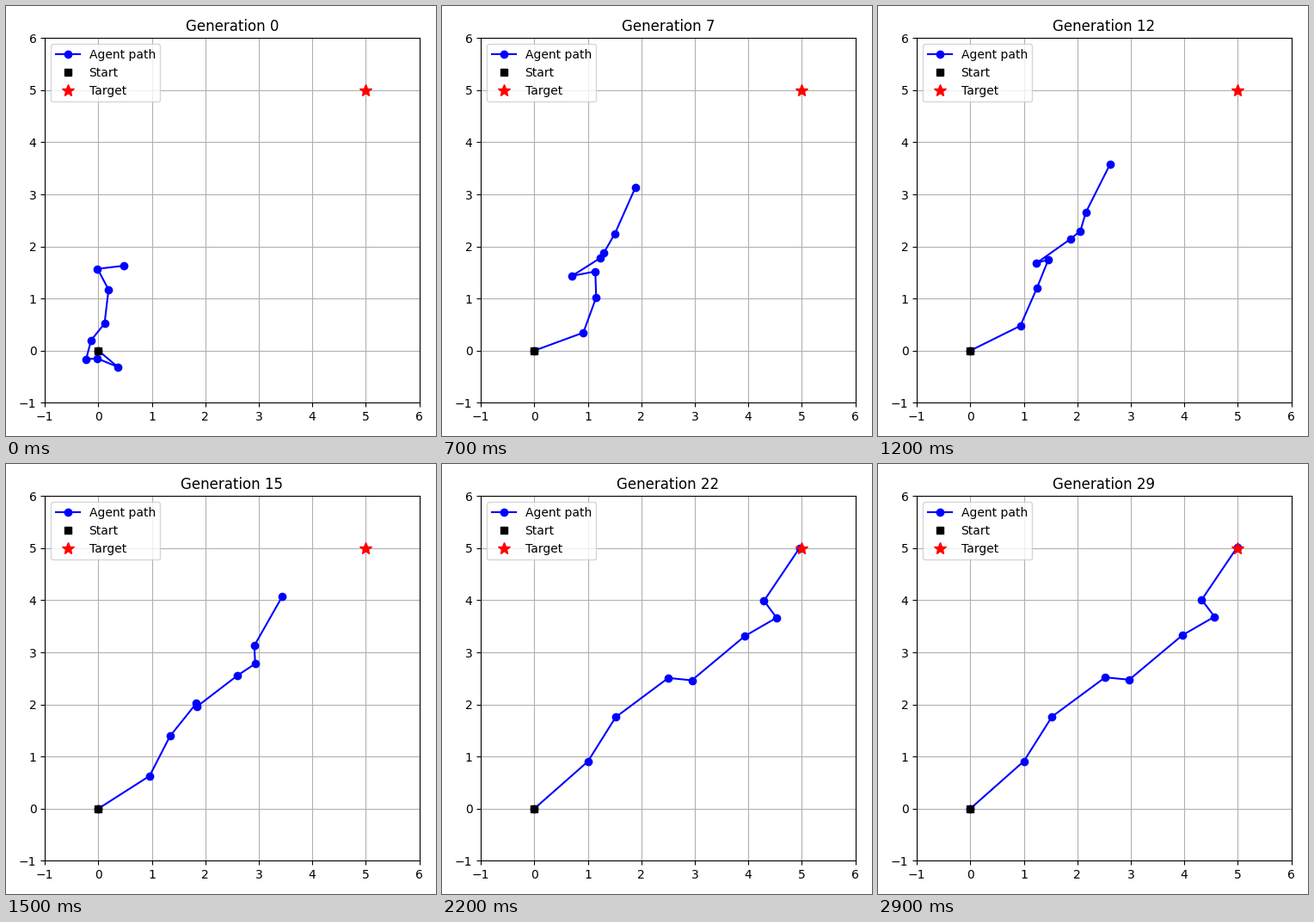
These frames come from a looping animation (500x500 px, 3000 ms). A matplotlib script:

```python
import numpy as np
import matplotlib.pyplot as plt
from matplotlib.animation import FuncAnimation

GENERATIONS = 30
EARLY, SETTLED = 7, 23
TARGET = (5, 5)


def walk(*stops):
    """Path from the origin through the given stops, as rows x and y."""
    return np.array([(0, 0), *stops]).T


wandering = walk((0.365, -0.315), (-0.02, -0.15), (-0.23, -0.165), (-0.135, 0.2),
                 (0.115, 0.52), (0.19, 1.17), (-0.015, 1.57), (0.48, 1.63))
climbing = walk((0.915, 0.345), (1.155, 1.02), (1.14, 1.52), (0.705, 1.435),
                (1.235, 1.78), (1.3, 1.88), (1.505, 2.245), (1.89, 3.135))
arriving = walk((1.0, 0.91), (1.525, 1.765), (2.52, 2.52), (2.97, 2.475),
                (3.965, 3.33), (4.565, 3.685), (4.325, 4.01), (4.99, 5.02))


def ease_out(u):
    return 1 - (1 - u) ** 3


def smoothstep(u):
    return u * u * (3 - 2 * u)


def blend(a, b, u):
    return a + (b - a) * u


def path_at(gen):
    """Quick early gains, then a steady approach that settles on the target."""
    if gen < EARLY:
        return blend(wandering, climbing, ease_out(gen / EARLY))
    u = min((gen - EARLY) / (SETTLED - EARLY), 1)
    return blend(climbing, arriving, smoothstep(u))


fig, ax = plt.subplots(figsize=(5, 5), dpi=100)
ax.set_xlim(-1, 6)
ax.set_ylim(-1, 6)
ax.grid(True)
path, = ax.plot([], [], "bo-", label="Agent path")
ax.plot(0, 0, "ks", label="Start")
ax.plot(*TARGET, "r*", markersize=10, label="Target")
ax.legend(loc="upper left")
title = ax.set_title("Generation 0")
fig.tight_layout()


def update(gen):
    path.set_data(*path_at(gen))
    title.set_text(f"Generation {gen}")
    return path, title


anim = FuncAnimation(fig, update, frames=GENERATIONS, interval=100,
                     repeat=True, repeat_delay=0, blit=False)
plt.show()
```
